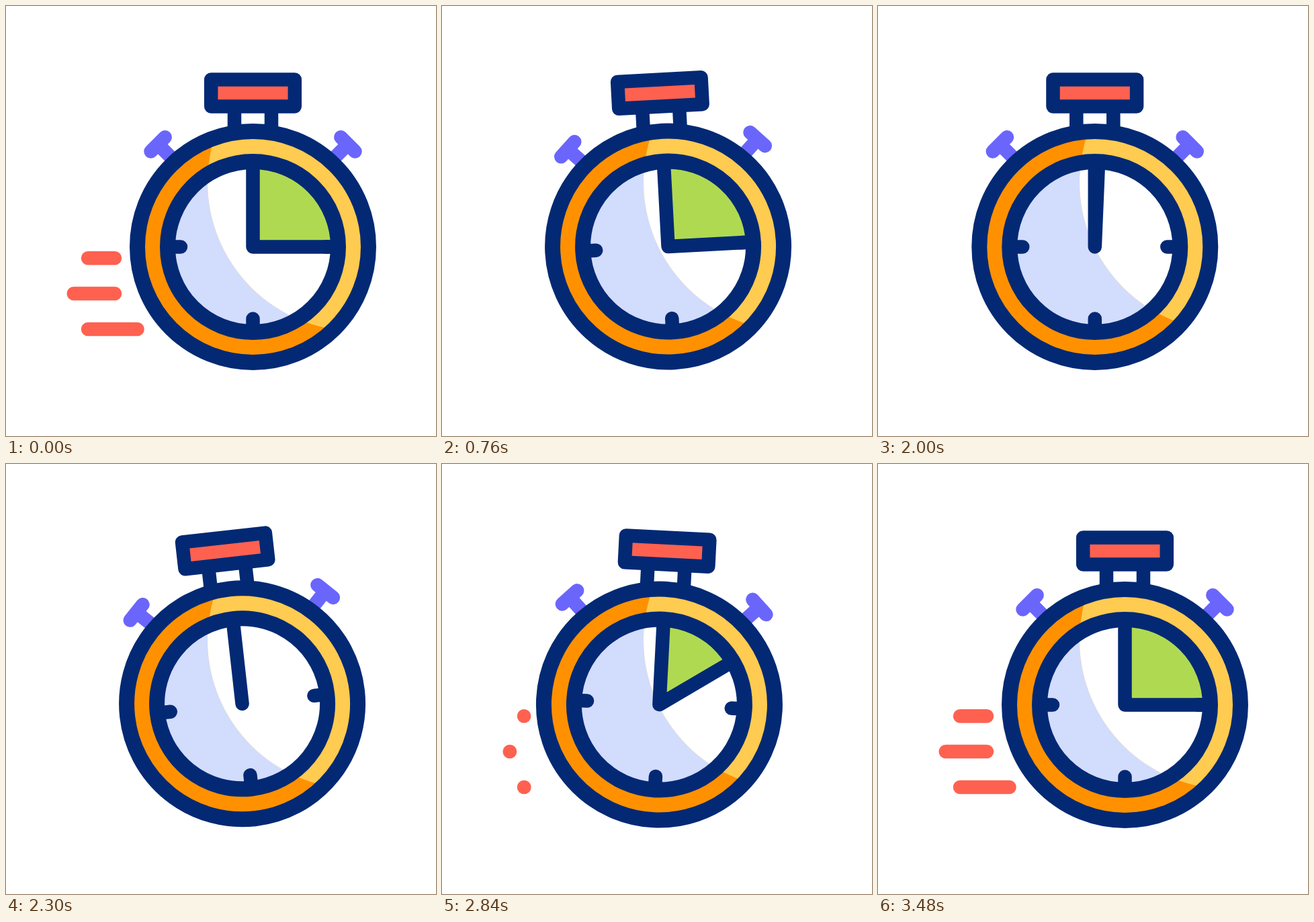
Animation of 640 by 640 pixels, one loop 3.6 s. Source, as an HTML page:

```html
<!DOCTYPE html>
<html lang="en">
<head>
<meta charset="utf-8">
<title>Stopwatch</title>
<style>
html, body { margin: 0; width: 100%; height: 100%; overflow: hidden; background: #fff; }
svg { display: block; width: 100vw; height: 100vh; }
.ink { stroke: #032974; stroke-width: 20.5; fill: none; stroke-linecap: round; stroke-linejoin: round; }
.ring { stroke: #032974; stroke-width: 23; fill: none; }
.pin { stroke: #6b66fb; stroke-width: 20.5; fill: none; }
.dash { stroke: #ff6150; stroke-width: 20.5; fill: none; stroke-linecap: round; }
</style>
</head>
<body>
<svg viewBox="0 0 640 640">
  <defs>
    <clipPath id="light"><circle cx="522" cy="262" r="222"/></clipPath>
  </defs>
  <g id="dashes">
    <path class="dash"/><path class="dash"/><path class="dash"/>
  </g>
  <g class="watch">
    <g class="pin">
      <path stroke-linecap="round" d="M-152 -142L-130.8 -163.2M152 -142L130.8 -163.2"/>
      <path d="M-141.4 -152.6L-110 -121.2M141.4 -152.6L110 -121.2"/>
    </g>
    <circle r="172" fill="#ff9100"/>
    <circle r="127" fill="#d2dcfd"/>
  </g>
  <g clip-path="url(#light)">
    <g class="watch">
      <circle r="172" fill="#ffcb50"/>
      <circle r="127" fill="#fff"/>
    </g>
  </g>
  <g class="watch">
    <path id="wedge" fill="#b0d952"/>
    <circle class="ring" r="172"/>
    <circle class="ring" r="127"/>
    <path class="ink" d="M-125 0H-107.5M125 0H107.5M0 125V107"/>
    <path class="ink" id="hands"/>
    <path class="ink" stroke-linecap="butt" d="M-27.5 -172V-209M27.5 -172V-209"/>
    <rect class="ink" style="fill:#ff6150" x="-62.3" y="-248.8" width="124.6" height="40"/>
  </g>
</svg>
<script>
const LOOP = 3600;
const PIVOT_Y = 99.3, ARM = 259.1;
const $ = s => document.querySelector(s);
const watch = document.querySelectorAll('.watch');
const dashes = document.querySelectorAll('.dash');
const wedge = $('#wedge'), hands = $('#hands');

const smooth = u => u * u * (3 - 2 * u);

// symmetric cubic-bezier(.74, 0, .26, 1)
function strong(u) {
  let lo = 0, hi = 1;
  for (let i = 0; i < 24; i++) {
    const m = (lo + hi) / 2, n = 1 - m;
    if (2.22 * m * n * n + 0.78 * m * m * n + m * m * m < u) lo = m; else hi = m;
  }
  return smooth((lo + hi) / 2);
}

// keys: [time, value] pairs
function at(keys, t, ease = smooth) {
  if (t <= keys[0][0]) return keys[0][1];
  for (let i = 1; i < keys.length; i++) {
    const [t0, a] = keys[i - 1], [t1, b] = keys[i];
    if (t < t1) return a + (b - a) * ease((t - t0) / (t1 - t0));
  }
  return keys[keys.length - 1][1];
}

const SWING = 7.75;
const slide = [[0, 367.5], [350, 322.8], [2706, 322.8], [3070, 367.5]];
const tilt = [
  [0, 0], [345, 17.6], [530, -SWING], [934, 0],
  [2063, 0], [2194, SWING], [2325, -SWING], [2456, SWING], [2587, -SWING], [2706, SWING],
  [3070, -SWING], [3480, 0]
];
const dial = [[940, 90], [2240, 0], [2600, 0], [3050, 90]];
const trail = [[0, 1], [200, 0], [2830, 0], [3070, 1]];
const rows = [[122, 162, 375.3], [100.7, 162, 428], [122, 195.6, 481]];

function draw(t) {
  const pose = `translate(${at(slide, t)} ${PIVOT_Y}) rotate(${at(tilt, t)}) translate(0 ${ARM})`;
  watch.forEach(g => g.setAttribute('transform', pose));

  const a = at(dial, t, strong) * Math.PI / 180;
  const x = Math.sin(a), y = -Math.cos(a);
  const point = r => `${x * r} ${y * r}`;
  wedge.setAttribute('d', `M0 0V-122A122 122 0 0 1 ${point(122)}Z`);
  hands.setAttribute('d', `M0 -122V0L${point(122)}`);

  const k = at(trail, t);
  $('#dashes').setAttribute('visibility', k > 0 ? 'visible' : 'hidden');
  rows.forEach(([x0, x1, row], i) =>
    dashes[i].setAttribute('d', `M${x0} ${row}H${x0 + (x1 - x0) * k}`));
}

const start = performance.now();
function tick() {
  draw((performance.now() - start) % LOOP);
  requestAnimationFrame(tick);
}
draw(0);
requestAnimationFrame(tick);
</script>
</body>
</html>
```
